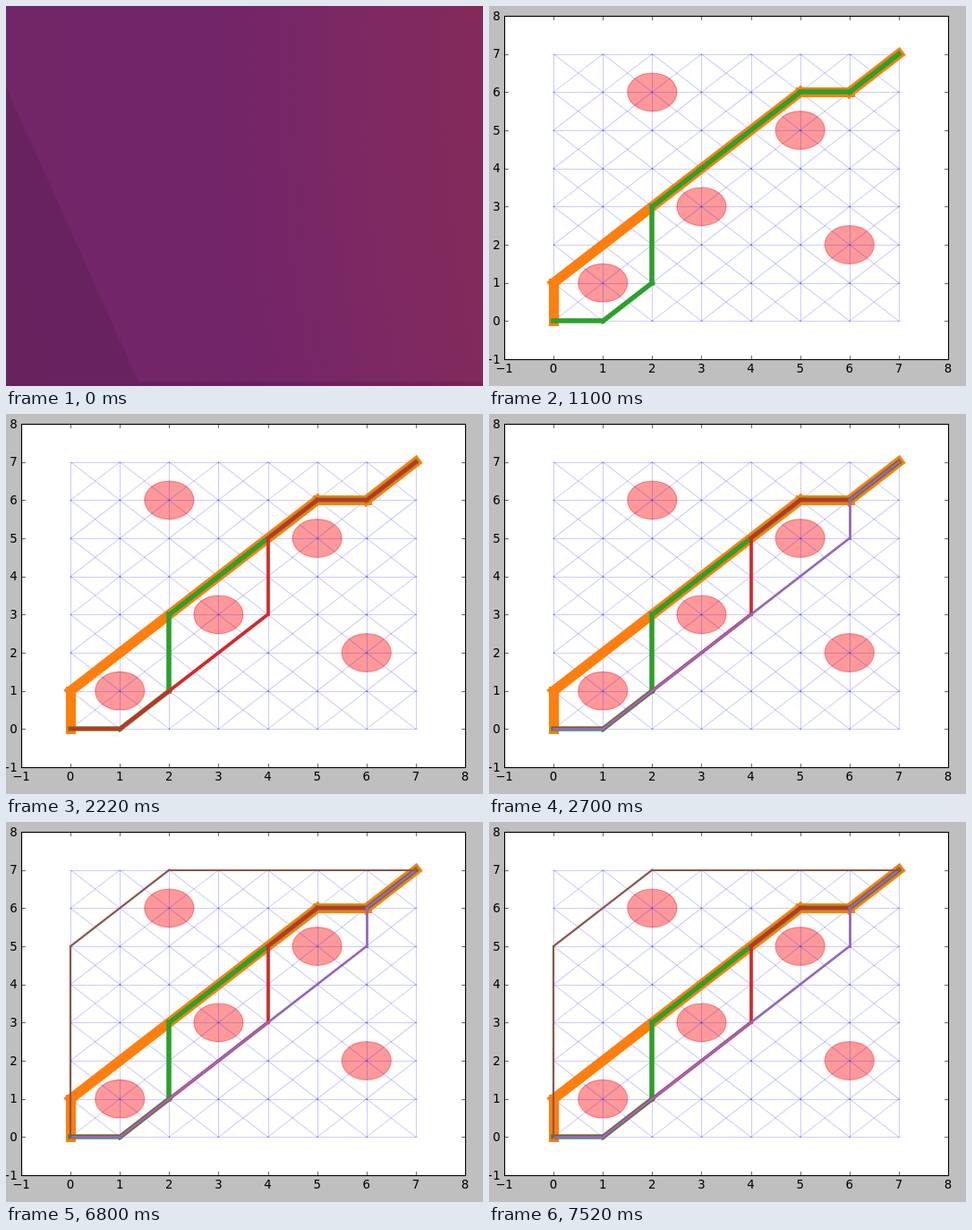
Animation, 533 px wide and 425 px high, one loop 8000 ms. Source, as an HTML page:

```html
<!DOCTYPE html>
<html lang="en">
<head>
<meta charset="utf-8">
<title>Grid paths</title>
<style>
  html, body { margin: 0; width: 100%; height: 100%; overflow: hidden; background: #bfbfbf; }
  svg { display: block; width: 533px; height: 425px; }
  text { font: 13.33px "DejaVu Sans", sans-serif; }
  .edge { stroke: #00f; stroke-width: 1.11; stroke-opacity: .2; stroke-linecap: square; }
  .disc { fill: #f00; fill-opacity: .4; stroke: #f00; stroke-opacity: .4; stroke-width: 1.11; }
  .tick { stroke: #000; stroke-width: .6; }
  .route { fill: none; stroke-linecap: square; }

  #splash, #red, #purple, #brown { animation: 8s step-end infinite; }
  #splash { animation-name: splash; }
  #red { animation-name: red; }
  #purple { animation-name: purple; }
  #brown { animation-name: brown; }
  @keyframes splash { 0% { visibility: visible } 13.75%, 100% { visibility: hidden } }
  @keyframes red { 0% { visibility: hidden } 18.75%, 100% { visibility: visible } }
  @keyframes purple { 0% { visibility: hidden } 33.75%, 100% { visibility: visible } }
  @keyframes brown { 0% { visibility: hidden } 85%, 100% { visibility: visible } }
</style>
</head>
<body>
<svg viewBox="0 0 533 425">
  <defs>
    <radialGradient id="dusk" gradientUnits="userSpaceOnUse" cx="1900" cy="80" r="1900">
      <stop offset=".72" stop-color="#842a5b"/>
      <stop offset=".778" stop-color="#7e2961"/>
      <stop offset=".82" stop-color="#792765"/>
      <stop offset=".874" stop-color="#732569"/>
      <stop offset="1" stop-color="#722668"/>
    </radialGradient>
  </defs>
  <rect width="533" height="425" fill="#bfbfbf"/>
  <rect x="17.5" y="11.5" width="496" height="384" fill="#fff"/>
  <g id="discs"></g>
  <g id="grid"></g>
  <g id="routes"></g>
  <g id="axes"></g>
  <rect x="17.5" y="11.5" width="496" height="384" fill="none" stroke="#000" stroke-width="1.11"/>
  <g id="splash">
    <rect width="533" height="425" fill="url(#dusk)"/>
    <path d="M0 90L148 420H0Z" fill-opacity=".085"/>
    <rect y="420" width="533" height="5" fill-opacity=".1"/>
  </g>
</svg>
<script>
  const STEP_X = 496 / 9, STEP_Y = 384 / 9;
  const px = x => 17 + (x + 1) * STEP_X;
  const py = y => 395 - (y + 1) * STEP_Y;

  function add(parent, tag, attrs, label) {
    const el = document.createElementNS("http://www.w3.org/2000/svg", tag);
    for (const key in attrs) el.setAttribute(key, attrs[key]);
    if (label !== undefined) el.textContent = label;
    document.getElementById(parent).append(el);
  }

  // Level and upright lines sit on whole or half pixels, by stroke width.
  function segment([x1, y1], [x2, y2], width) {
    const straight = x1 === x2 || y1 === y2;
    const shift = Math.round(width) % 2 / 2;
    const snap = v => straight ? Math.floor(v + .5) + shift : v;
    return `M${snap(px(x1))} ${snap(py(y1))}L${snap(px(x2))} ${snap(py(y2))}`;
  }

  for (const [x, y] of [[1, 1], [3, 3], [5, 5], [2, 6], [6, 2]])
    add("discs", "ellipse", { class: "disc", cx: px(x), cy: py(y), rx: STEP_X / 2, ry: STEP_Y / 2 });

  const inside = v => v >= 0 && v <= 7;
  for (let x = 0; x <= 7; x++)
    for (let y = 0; y <= 7; y++)
      for (const [dx, dy] of [[1, 0], [0, 1], [1, 1], [1, -1]])
        if (inside(x + dx) && inside(y + dy))
          add("grid", "path", { class: "edge", d: segment([x, y], [x + dx, y + dy], 1.11) });

  const routes = [
    ["orange", "#ff7f0e", "00 01 56 66 77"],
    ["green", "#2ca02c", "00 10 21 23 56 66 77"],
    ["red", "#d62728", "00 10 43 45 56 66 77"],
    ["purple", "#9467bd", "00 10 65 66 77"],
    ["brown", "#8c564b", "00 05 27 77"]
  ];
  routes.forEach(([id, stroke, stops], i) => {
    const width = 11.11 / (i + 1);
    const points = stops.split(" ").map(s => [+s[0], +s[1]]);
    const d = points.slice(1).map((p, k) => segment(points[k], p, width)).join("");
    add("routes", "path", { id, class: "route", stroke, "stroke-width": width, d });
  });

  for (let n = -1; n <= 8; n++) {
    const x = Math.floor(px(n) + .5) + .5, y = Math.floor(py(n) + .5) + .5;
    const label = String(n).replace("-", "\u2212");
    add("axes", "path", { class: "tick", d: `M${x} 395.5v-4.4M${x} 11.5v4.4M17.5 ${y}h4.4M513.5 ${y}h-4.4` });
    add("axes", "text", { x: px(n), y: 409.5, "text-anchor": "middle" }, label);
    add("axes", "text", { x: 12.8, y: py(n) + 4.6, "text-anchor": "end" }, label);
  }
</script>
</body>
</html>
```
